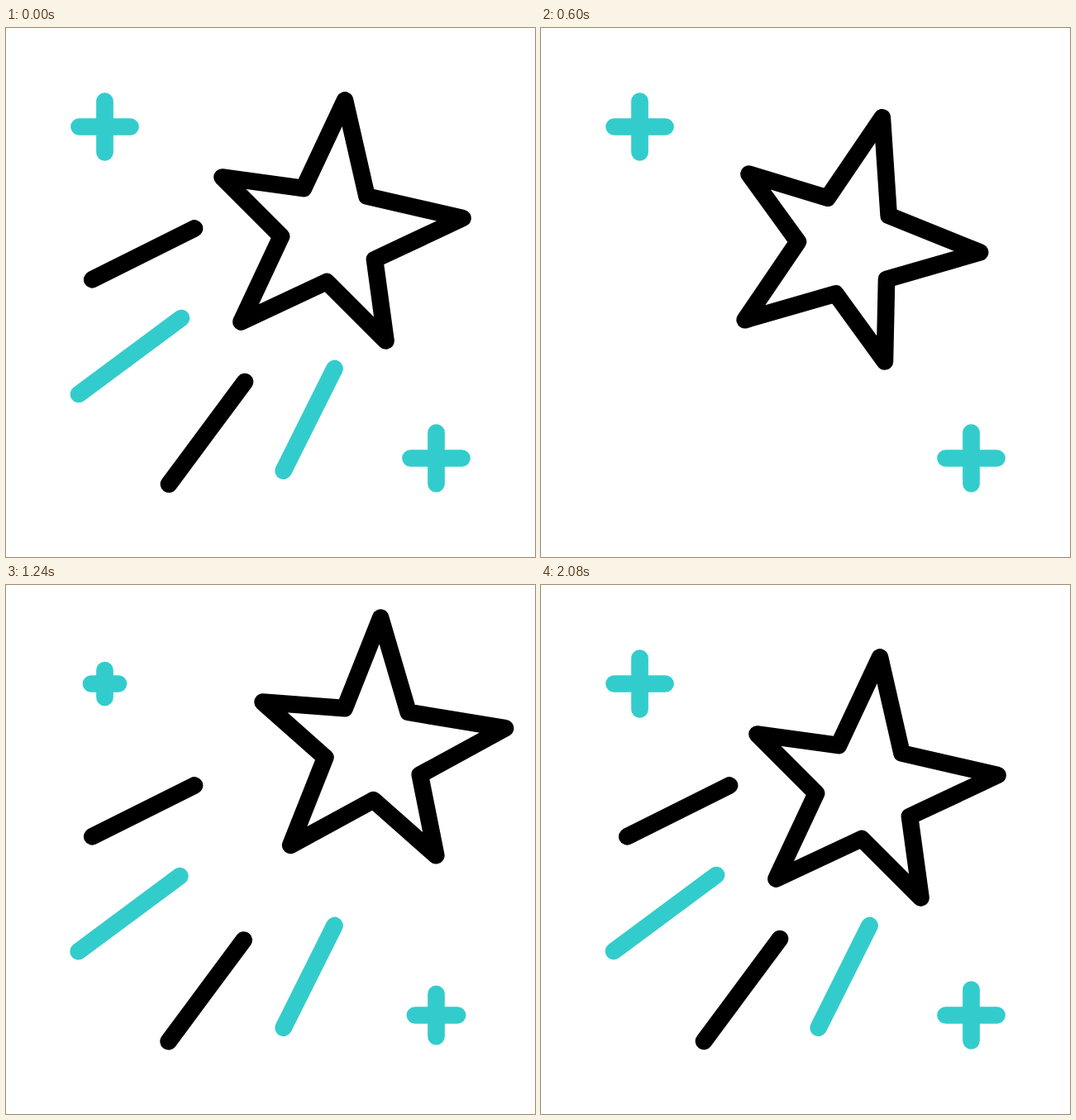
Animation of 640 by 640 pixels, one loop 2400 ms. Source, as an HTML page:

```html
<!DOCTYPE html>
<html lang="en">
<head>
<meta charset="utf-8">
<title>Shooting star</title>
<style>
  html, body { margin: 0; width: 100%; height: 100%; overflow: hidden; background: #fff; }
  svg { display: block; width: 100vw; height: 100vh; }
  path { fill: none; stroke: #000; stroke-width: 20.7; stroke-linecap: round; stroke-linejoin: round; }
  .teal { stroke: #33cccc; }
</style>
</head>
<body>
<svg id="stage" viewBox="0 0 640 640"></svg>
<script>
const SIZE = 640, LOOP = 2400, STEP = 40;

// The whole icon is symmetric about the rising diagonal.
const mirror = ([x, y]) => [SIZE - y, SIZE - x];

// Eased 0 to 1, from a start time over a duration.
function ramp(t, start, time) {
  const x = Math.min(1, Math.max(0, (t - start) / time));
  return x * x * (3 - 2 * x);
}

function addPath(teal) {
  const el = document.createElementNS("http://www.w3.org/2000/svg", "path");
  if (teal) el.setAttribute("class", "teal");
  return document.getElementById("stage").appendChild(el);
}

function makeStar() {
  const half = [[552.5, 230], [446, 280], [459.5, 378.5], [388, 307]];
  const points = [[436.5, 203.5], ...half, [284.5, 355.5], ...half.map(mirror).reverse()];
  const el = addPath();
  el.setAttribute("d", `M${points.join("L")}Z`);

  // Pull back, throw out, settle to rest.
  const swing = (t, back, out, settle) =>
    back * ramp(t, 0, 567) + (out - back) * ramp(t, 567, 415) - out * ramp(t, 982, settle);

  return t => {
    const rebound = 6 * (ramp(t, 1575, 155) - ramp(t, 1730, 340));
    const shift = swing(t - 193, -25, 56, 400) + rebound;
    const turn = swing(t - 247, 13.3, -3.5, 750);
    el.setAttribute("transform",
      `translate(${shift} ${-0.92 * shift}) rotate(${turn} 407.5 233.5)`);
  };
}

function makeTrail([x, y], [hx, hy], back, teal) {
  const el = addPath(teal);
  return t => {
    const p = ramp(t, back, 385);
    const size = t < back ? 1 - ramp(t, 60, 340) : p ** 1.2;
    const away = t < back ? 0 : 1 - p;
    const d = `M${x - 43 * away} ${y + 25 * away}l${(hx - x) * size} ${(hy - y) * size}`;
    el.setAttribute("d", size > 0 ? d : "");
  };
}

function makeTrailPair(tail, head, back, mirrorBack, teal) {
  return [
    makeTrail(tail, head, back, teal),
    makeTrail(mirror(tail), mirror(head), mirrorBack, !teal)
  ];
}

function makeSpark(c, delay) {
  const el = addPath(true);
  return time => {
    const t = time - delay;
    const r = 31 - 18 * ramp(t, 0, 240) + 21.5 * ramp(t, 240, 430) - 3.5 * ramp(t, 670, 120);
    el.setAttribute("d", `M${c - r} ${c}h${2 * r}M${c} ${c - r}v${2 * r}`);
  };
}

const parts = [
  makeStar(),
  ...makeTrailPair([104.3, 304.3], [228, 242.5], 761, 812, false),
  ...makeTrailPair([88, 443], [212, 351], 876, 876, true),
  makeSpark(119.5, 890),
  makeSpark(SIZE - 119.5, 760)
];

const start = performance.now();
function tick() {
  const t = (performance.now() - start) % LOOP;
  const shown = Math.floor(t / STEP) * STEP;
  for (const draw of parts) draw(shown);
  requestAnimationFrame(tick);
}
tick();
</script>
</body>
</html>
```
